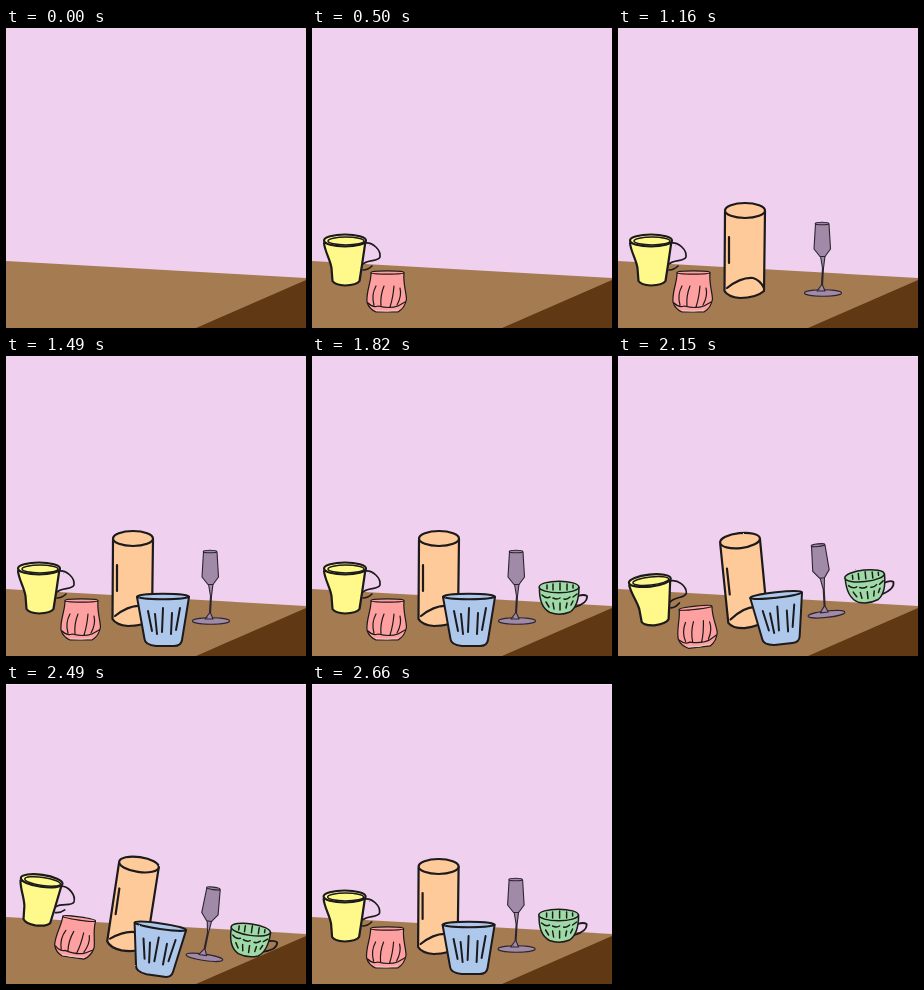
An HTML page for the animation above (2.83 s loop, 300 by 300 pixels).

```html
<!DOCTYPE html>
<html lang="en">
<head>
<meta charset="utf-8">
<title>Cups on a table</title>
<style>
  html, body { margin: 0; width: 100%; height: 100%; overflow: hidden; background: #efd0ee; }
  svg { display: block; width: 100vw; height: 100vh; }
  #cups { stroke: #1c1a1c; stroke-linecap: round; stroke-linejoin: round; }
  .line { fill: none; }
</style>
</head>
<body>
<svg viewBox="0 0 300 300">
  <filter id="rough" filterUnits="userSpaceOnUse" x="0" y="0" width="300" height="300" color-interpolation-filters="sRGB">
    <feTurbulence type="fractalNoise" baseFrequency=".25" seed="4"/>
    <feDisplacementMap in="SourceGraphic" scale="1.6" xChannelSelector="R" yChannelSelector="G"/>
  </filter>

  <path fill="#efd0ee" d="M0 0H300V300H0Z"/>
  <path id="topEdge" fill="#f4e0f3" d="M0 0H300V1H0Z"/>
  <path fill="#a57c52" d="M0 233L300 250V300H0Z"/>
  <path fill="#603813" d="M300 252V300H190Z"/>

  <g filter="url(#rough)">
    <g id="cups">
      <!-- yellow mug -->
      <g fill="#fff98c" stroke-width="2.2">
        <path class="line" stroke-width="1.7" d="M53 215C61 214 69 222 68 229C66 234 56 231 51 236M60 238Q56 242 51 242"/>
        <path d="M12 215C13 224 18 231 19.500 240L20.500 253Q23 257 33 257.500Q45 257 47.500 253L50 237L53.500 213Z"/>
        <ellipse cx="33" cy="212.500" rx="21" ry="6"/>
        <ellipse class="line" stroke-width="1.5" cx="34" cy="213" rx="18" ry="4"/>
      </g>

      <!-- pink tumbler -->
      <g fill="#ffa0a0" stroke-width="1.2">
        <path d="M59 245C59 255 54 264 55 274Q57 281 64 284H86Q93 280 94.500 271C94 262 91 256 92 245Z"/>
        <ellipse cx="75.500" cy="244.500" rx="16.500" ry="1.600"/>
        <path class="line" d="M64 258Q59 267 62 277M72 258Q68 268 69 278M82 258Q81 270 78 279M88 260Q90 268 85 277M56 275Q61 280 66 278Q78 281 86 278L93 274"/>
        <path class="line" stroke="#e9c9cb" stroke-width="1" d="M64 282.500Q75 284 86 282"/>
      </g>

      <!-- orange cylinder -->
      <g fill="#ffca99" stroke-width="2.2">
        <path d="M107 184L106.500 263Q110 269 122 270Q138 270 146 263L147 183Z"/>
        <ellipse cx="127" cy="182.500" rx="20" ry="7.500"/>
        <path class="line" d="M111 209V235M109 260Q123 249 135 250Q142 252 146 260"/>
      </g>

      <!-- purple flute -->
      <g fill="#a08aa8" stroke="#2d2530" stroke-width="1.1">
        <ellipse cx="205" cy="265" rx="18.500" ry="3.200"/>
        <path d="M202.500 228L204.500 240L203.500 257L199 263H207L204.500 257L205.500 240L207 228Z"/>
        <path d="M197.500 196L196 221L202 228.500H207L212.500 221L211 196Z"/>
        <ellipse cx="204" cy="195.500" rx="6.800" ry="1.300"/>
      </g>

      <!-- blue glass -->
      <g fill="#aec8ec" stroke-width="2">
        <path d="M131 241L138.500 283Q139 289 150 290H168Q175 290 176 284L183 241Z"/>
        <ellipse cx="157" cy="240.500" rx="26" ry="2.800"/>
        <path class="line" d="M142 255L146 275M149 258L151 278M157 252L156 276M166 257L165 278M174 252L170 274"/>
      </g>

      <!-- green teacup -->
      <g fill="#9edaa5" stroke-width="1.5">
        <path class="line" stroke-width="1.8" d="M266 240Q272 238 275 240Q276 247 263 251"/>
        <path d="M227.500 231C227 246 231 253 238 256.500Q248 260 258 256C264 252 267 242 267 231Z"/>
        <ellipse cx="247" cy="231" rx="19.800" ry="5.800"/>
        <path class="line" d="M235 229V233M241 228V234M248 227V234M255 228V234M261 229V232M230 239Q234 243 238 241M241 242Q245 244 248 242M252 243Q255 244 258 241M261 241L265 238M234 246L237 251M241 247L242 253M248 247V254M255 247L254 252M261 245L259 249"/>
      </g>
    </g>
  </g>
</svg>
<script>
  const LOOP = 2830, FIRST = 170, STEP = 330;
  const SWAY_START = 2150, SWAY_STEP = 170, SWAY = [-6.2, 0, 8.2, 0];
  const group = document.getElementById('cups');
  const topEdge = document.getElementById('topEdge');
  const cups = [...group.children];
  const show = (el, on) => el.setAttribute('visibility', on ? 'visible' : 'hidden');
  const start = performance.now();

  function draw() {
    const t = (performance.now() - start) % LOOP;
    const swaying = t >= SWAY_START;
    const angle = swaying ? SWAY[Math.floor((t - SWAY_START) / SWAY_STEP)] : 0;
    cups.forEach((cup, i) => show(cup, t >= FIRST + i * STEP));
    show(topEdge, swaying);
    group.setAttribute('transform', `translate(${swaying ? -0.4 : 0} 0) rotate(${angle} 144 226)`);
    requestAnimationFrame(draw);
  }
  draw();
</script>
</body>
</html>
```
